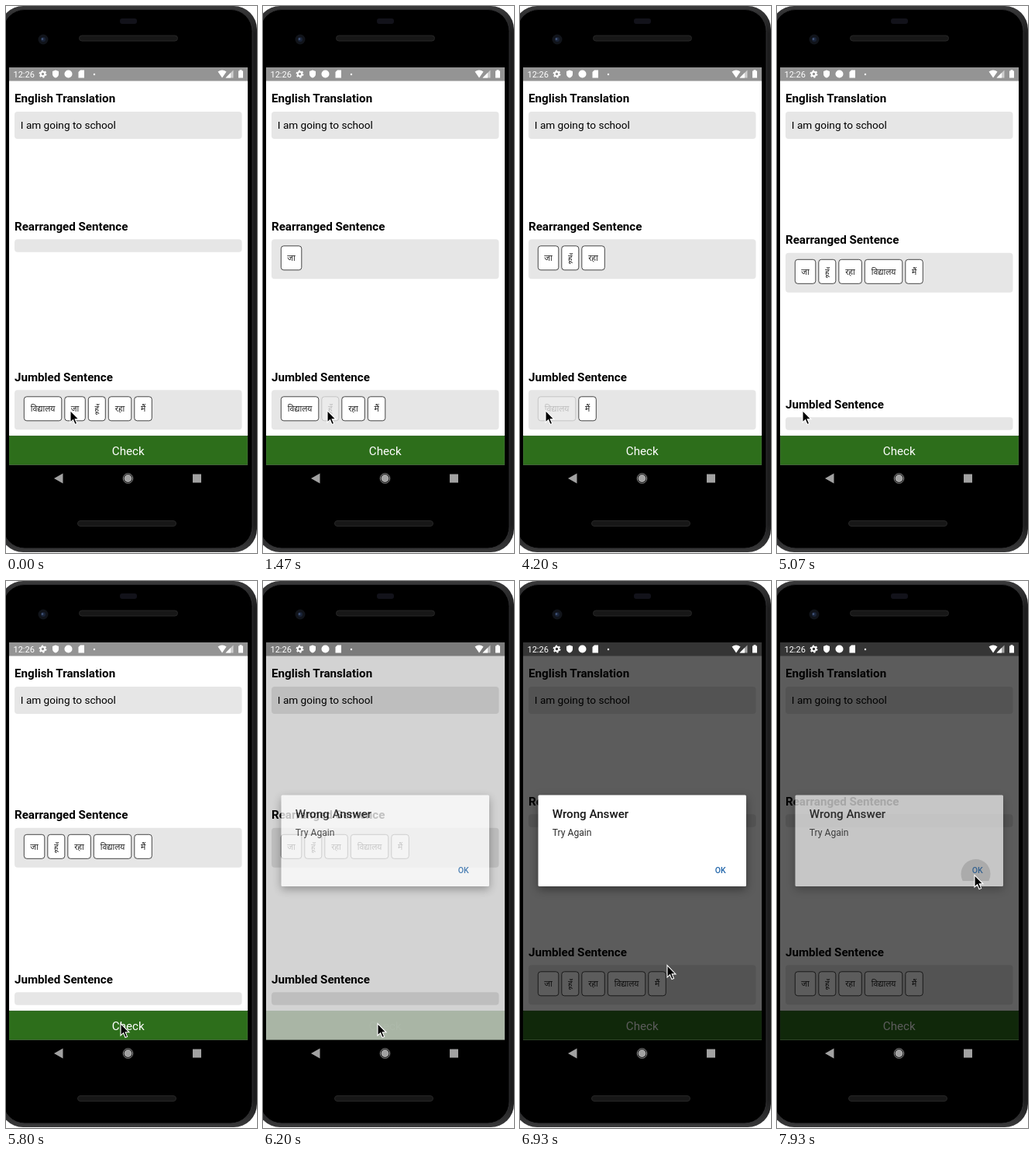
An HTML page that plays this animation: 324x704 px, repeating every 8000 ms.

```html
<!DOCTYPE html>
<html lang="en">
<head>
<meta charset="utf-8">
<title>Sentence game</title>
<style>
  html, body { margin: 0; width: 100%; height: 100%; overflow: hidden; background: #fff; }
  svg { display: block; width: 100vw; height: 100vh; }
  text { font-family: Roboto, sans-serif; font-size: 15.15px; }
  .heading { font-weight: 700; }
  .body { font-size: 13.63px; }
  .small { font-size: 12.12px; }
  .word { font: 10.5px "Noto Sans Devanagari", "Noto Sans", sans-serif; text-anchor: middle; fill: #222; }
  .medium { font-weight: 500; }
  .card { filter: drop-shadow(0 4px 6px rgba(0, 0, 0, .4)); }
</style>
</head>
<body>
<svg viewBox="0 0 324 704">
  <defs>
    <clipPath id="okArea"><rect x="232" y="356" width="48" height="30"/></clipPath>
    <linearGradient id="rim" x2="0" y2="1">
      <stop stop-color="#3a3a3b"/><stop offset=".05" stop-color="#1d1d1e"/>
      <stop offset=".95" stop-color="#1d1d1e"/><stop offset="1" stop-color="#3a3a3b"/>
    </linearGradient>
  </defs>

  <!-- phone body -->
  <rect x="-8" y="0" width="332" height="703" rx="30" fill="url(#rim)"/>
  <rect x="-4" y="4.500" width="322" height="693.500" rx="28" stroke="#303032"/>
  <rect x="147" y="16" width="22" height="7" rx="3" fill="#12121a"/>
  <circle cx="48" cy="43" r="6.500" fill="#11141a"/>
  <circle cx="48" cy="43" r="3" fill="#1a2438"/>
  <circle cx="47" cy="42.500" r="1.300" fill="#46587c"/>
  <g fill="#171717" stroke="#262626">
    <rect x="94.500" y="38" width="127" height="7" rx="3.500"/>
    <rect x="92.500" y="662.500" width="127" height="7" rx="3.500"/>
  </g>
  <g fill="#a2a2a2">
    <path d="M62 608l11.500-6.500v13z"/>
    <circle cx="157.500" cy="608" r="5"/>
    <circle cx="157.500" cy="608" r="6.300" fill="none" stroke="#8c8c8c"/>
    <rect x="241" y="602.500" width="11" height="11"/>
  </g>

  <!-- app -->
  <rect x="4" y="79" width="308" height="511.500" fill="#fff"/>
  <rect x="4" y="79" width="308" height="17.500" fill="#949494"/>
  <text class="heading" x="11" y="124">English Translation</text>
  <rect x="11" y="136" width="293.500" height="35" rx="4" fill="#e6e6e6"/>
  <text class="body" x="18.800" y="158">I am going to school</text>
  <g id="lists"></g>
  <g id="check">
    <rect x="4.300" y="553.300" width="307.400" height="36.900" fill="#2d6e1b" stroke="#1f5512" stroke-width=".7"/>
    <text x="157.700" y="578" fill="#fff" text-anchor="middle">Check</text>
  </g>
  <rect id="dim" x="4" y="79" width="308" height="511.500"/>

  <!-- status icons -->
  <g fill="#fff">
    <text x="9.500" y="91.500" style="font-size:11px">12:26</text>
    <circle cx="47.500" cy="87.500" r="2.700" fill="none" stroke="#fff" stroke-width="2"/>
    <circle cx="47.500" cy="87.500" r="4.300" fill="none" stroke="#fff" stroke-width="1.400" stroke-dasharray="2.250"/>
    <path d="M64 82.500l4 1.500v3.500q0 3.500-4 5-4-1.500-4-5V84z"/>
    <circle cx="80.500" cy="87.500" r="5"/>
    <path d="M96 82.500h5v10h-7.500V85z"/>
    <circle cx="114" cy="88" r="1.200"/>
    <path d="M273.500 84.500q5.500-4 11 0l-5.500 8z"/>
    <path d="M293.500 82.500v10h-10z" opacity=".55"/>
    <path d="M290 86v6.500h-6.500z"/>
    <path d="M300 83.500h1.500v-1.200h3v1.200h1.500v9h-6z"/>
  </g>

  <g id="dialog">
    <rect class="card" x="23.500" y="275.500" width="268.500" height="117.500" rx="1.500" fill="#fff"/>
    <g clip-path="url(#okArea)"><circle id="ripple" cx="256.500" cy="377" fill-opacity=".16"/></g>
    <text class="medium" x="41.800" y="305" fill="#161616">Wrong Answer</text>
    <text class="small" x="41.800" y="328" fill="#2c2c2c">Try Again</text>
    <text class="medium" x="251.800" y="376.300" fill="#2468ac" style="font-size:10.6px">OK</text>
  </g>
  <path id="cursor" d="M0 0V15.500L3.600 12.200 6 18 8.600 16.900 6.200 11.300H11Z" stroke="#fff" stroke-width="1.100"/>
</svg>
<script>
const LOOP = 8000;
const $ = id => document.getElementById(id);
const WORDS = { 'विद्यालय': 48.5, 'जा': 26.5, 'हूँ': 22, 'रहा': 29.5, 'मैं': 22.5 };
const START = Object.keys(WORDS);

// Each tap fades the tile at an index, then moves its word up.
const TAPS = [
  { at: 1000, fade: 200, move: 1470, index: 1 },
  { at: 2399, fade: 1, move: 2730, index: 1 },
  { at: 3130, fade: 70, move: 3530, index: 1 },
  { at: 4000, fade: 150, move: 4330, index: 0 },
  { at: 4799, fade: 1, move: 5000, index: 0 }
];
const RESET = 6420;

// Cursor moves: start, end, from, to.
const MOVES = [
  [1900, 2200, [83, 520.5], [87, 522.5]],
  [3600, 3800, [87, 522.5], [33, 520.5]],
  [5130, 5800, [33, 520.5], [148, 569.5]],
  [6730, 7200, [148, 569.5], [255, 378.5]]
];

const ramp = (t, a, b) => Math.min(1, Math.max(0, (t - a) / (b - a)));
const ease = p => p * p * (3 - 2 * p);
const mix = (a, b, p) => a + (b - a) * p;

function gameAt(t) {
  const jumbled = [...START], chosen = [], opacity = [1, 1, 1, 1, 1];
  for (const tap of TAPS) {
    if (t < tap.at) break;
    const pressed = ramp(t, tap.at, tap.at + tap.fade);
    const released = ramp(t, tap.move, tap.move + 250);
    opacity[tap.index] = 1 - .8 * pressed * (1 - released);
    if (t >= tap.move) chosen.push(...jumbled.splice(tap.index, 1));
  }
  return t < RESET ? { jumbled, chosen, opacity } : { jumbled: chosen, chosen: [], opacity };
}

function section(title, words, top, opacity = []) {
  let x = 23.3;
  const tiles = words.map((word, i) => {
    const w = WORDS[word], left = x;
    x += w + 4;
    return `<g opacity="${opacity[i] ?? 1}">
      <rect x="${left}" y="${top + 8.5}" width="${w}" height="31" rx="3.5" fill="#fff" stroke="#1a1a1a" stroke-width=".8"/>
      <text class="word" x="${left + w / 2}" y="${top + 28}">${word}</text></g>`;
  });
  return `<text class="heading" x="11" y="${top - 11.5}">${title}</text>
    <rect x="11" y="${top}" width="293.5" height="${words.length ? 51 : 16.5}" rx="4" fill="#e6e6e6"/>${tiles.join('')}`;
}

function cursorAt(t) {
  let pos = MOVES[0][2];
  for (const [a, b, from, to] of MOVES) {
    if (t < a) break;
    const p = ease(ramp(t, a, b));
    pos = from.map((v, i) => mix(v, to[i], p));
  }
  return pos;
}

let shown = '';
function render(t) {
  const { jumbled, chosen, opacity } = gameAt(t);
  const shift = jumbled.length ? 0 : 17.5;
  const lists = section('Rearranged Sentence', chosen, 300.3 + shift)
    + section('Jumbled Sentence', jumbled, 494.3 + shift * 2, opacity);
  if (lists !== shown) $('lists').innerHTML = shown = lists;

  // The button and its label fade separately, so the label sinks into the fill.
  const checkPress = ramp(t, 5870, 6020) * (1 - ramp(t, RESET, RESET + 250));
  const [fill, label] = $('check').children;
  fill.setAttribute('opacity', 1 - .76 * checkPress);
  label.setAttribute('opacity', 1 - .9 * checkPress);

  $('dim').setAttribute('opacity', .64 * ramp(t, 6155, 6325));
  $('dialog').setAttribute('opacity', ramp(t, 6110, 6230) * (1 - .35 * ramp(t, 7865, 7930)));
  $('ripple').setAttribute('r', t < 7730 ? 0 : mix(8, 19, ramp(t, 7730, 7930)));
  $('cursor').setAttribute('transform', `translate(${cursorAt(t)})`);
}

const begin = performance.now();
function tick() {
  render((performance.now() - begin) % LOOP);
  requestAnimationFrame(tick);
}
tick();
</script>
</body>
</html>
```
